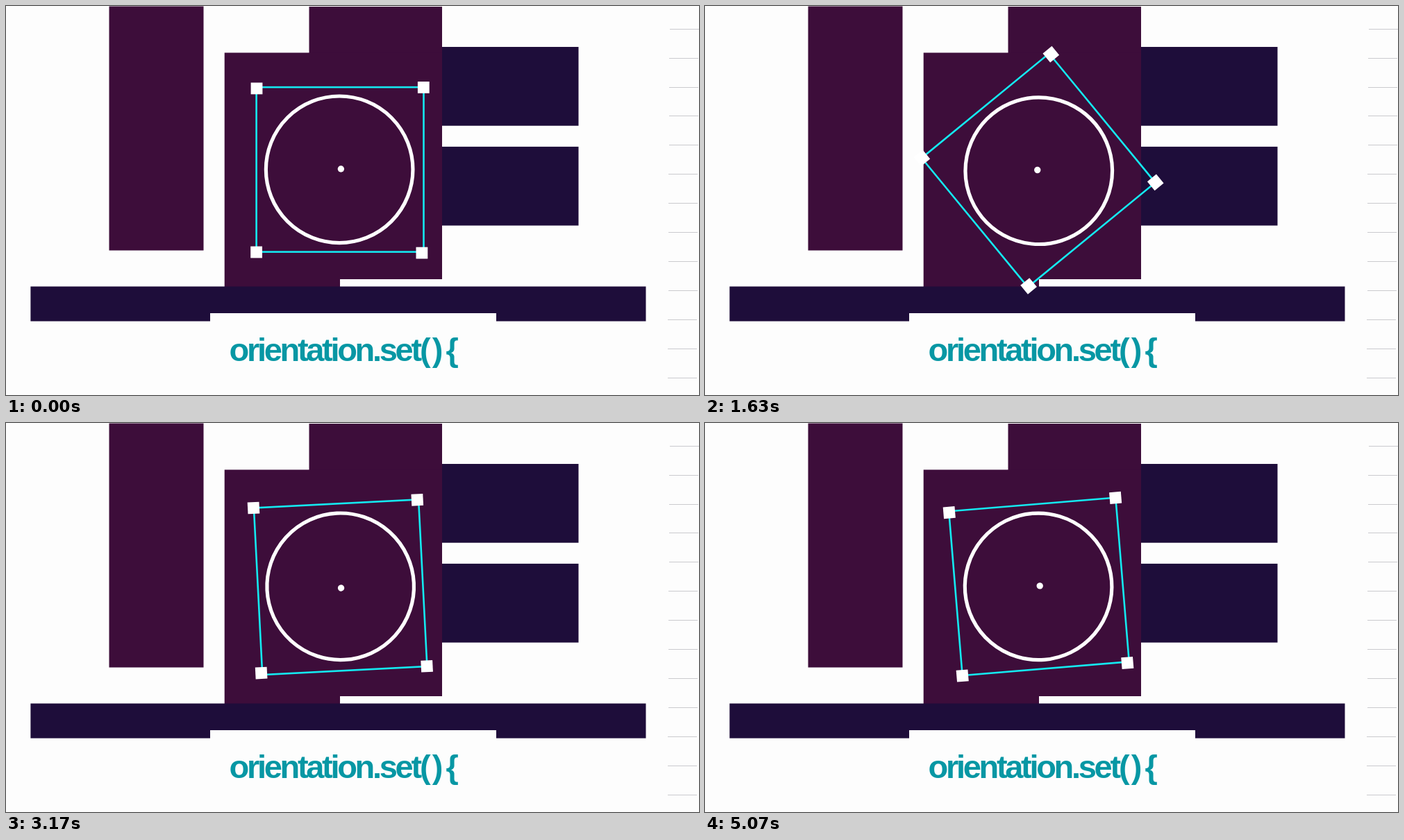
These frames come from a looping animation (998 by 561 pixels, 5.11 s). An HTML page with a canvas:

```html
<!DOCTYPE html>
<html lang="en">
<head>
<meta charset="utf-8">
<title>Rotating selection</title>
<style>
  html, body { margin: 0; width: 100%; height: 100%; overflow: hidden; background: #fdfdfd; }
  canvas, svg { position: absolute; left: 0; top: 0; width: 100%; height: 100%; display: block; }
  text { font: 700 47px "Liberation Sans", Arial, sans-serif; fill: #0797a4; }
  .word { letter-spacing: -3.3px; }
  .call { letter-spacing: 2px; }
</style>
</head>
<body>
<canvas id="stage" width="998" height="561"></canvas>
<svg viewBox="0 0 998 561">
  <text class="word" x="321.5" y="512">orientation.set</text>
  <text class="call" x="596" y="512">()</text>
  <text x="633.5" y="512">{</text>
</svg>
<script>
const ctx = document.getElementById('stage').getContext('2d');

const LOOP = 5110, STEPS = 153, TURNS = 2;
const PIVOT = { x: 480.9, y: 236.6 };
const PAPER = '#fdfdfd', PLUM = '#3d0d3a', NAVY = '#1e0d3a', CYAN = '#14e9f0';

function box(color, x1, y1, x2, y2) {
  ctx.fillStyle = color;
  ctx.fillRect(x1, y1, x2 - x1, y2 - y1);
}

function disc(x, y, r) {
  ctx.beginPath();
  ctx.arc(x, y, r, 0, Math.PI * 2);
}

function handle(x, y) {
  box('#fff', x - 8.4, y - 8.4, x + 8.4, y + 8.4);
}

function drawBlocks() {
  box(PAPER, 0, 0, 998, 561);
  box(PLUM, 148.5, .5, 284.5, 352.5);
  box(PLUM, 436.5, 1, 628, 394);
  box(PLUM, 314.7, 67.4, 481, 405);
  box(PLUM, 480, 67.4, 628, 394);
  box(NAVY, 628, 59, 824.5, 172.7);
  box(NAVY, 628, 202.9, 824.5, 316.6);
  box(NAVY, 35.4, 404.5, 921.5, 454.6);
  box(PAPER, 294, 443, 706, 455);
  for (let i = 0; i < 13; i++) {
    const x = Math.round(955.6 - i * .23), y = Math.round(32.6 + i * 41.95);
    box('#cacace', x, y, x + 42, y + 1);
  }
}

// One rigid drawing, slightly off centre, turning about the pivot.
function drawSelection(angle) {
  ctx.save();
  ctx.translate(PIVOT.x, PIVOT.y);
  ctx.rotate(angle);

  ctx.strokeStyle = '#fff';
  ctx.lineWidth = 5.2;
  disc(-.75, -.8, 105.8);
  ctx.stroke();

  ctx.fillStyle = '#fff';
  disc(1.45, -1.6, 4.7);
  ctx.fill();

  ctx.strokeStyle = CYAN;
  ctx.lineWidth = 2.6;
  ctx.strokeRect(-120.3, -119.5, 240.9, 237.5);

  handle(-119.9, -117.7);
  handle(120.4, -119.2);
  handle(118, 119.5);
  handle(-120.3, 118.4);
  ctx.restore();
}

function draw(now) {
  // Poses change 30 times a second, with starts rounded to 10 ms.
  const step = Math.min(STEPS - 1, Math.floor((now % LOOP + 4) * .03));
  drawBlocks();
  drawSelection(step / STEPS * TURNS * Math.PI * 2);
}

let start;
function tick(now) {
  if (start === undefined) start = now;
  draw(Math.max(0, now - start));
  requestAnimationFrame(tick);
}
draw(0);
requestAnimationFrame(tick);
</script>
</body>
</html>
```
